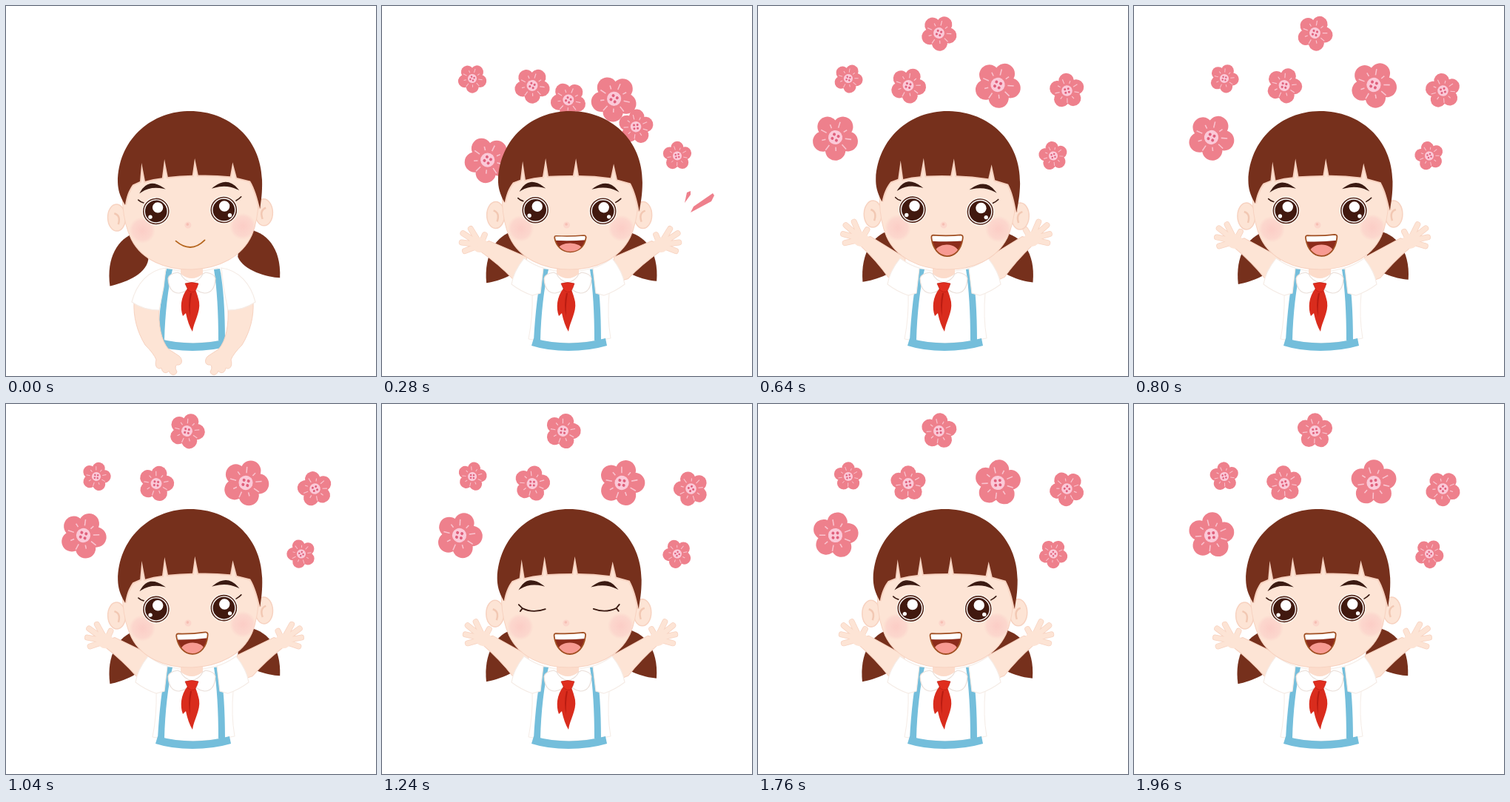
Animation of 500 by 500 pixels, one loop 2 s. Source, as an HTML page with a canvas:

```html
<!DOCTYPE html>
<html lang="en">
<head>
<meta charset="utf-8">
<title>Girl with blossoms</title>
<style>
html, body { margin: 0; width: 100%; height: 100%; overflow: hidden; background: #fff; }
canvas { display: block; width: 500px; height: 500px; }
</style>
</head>
<body>
<canvas id="stage" width="500" height="500"></canvas>
<script>
const ctx = document.getElementById('stage').getContext('2d');
const LOOP = 2000, STEP = 40, TAU = Math.PI * 2, RAD = Math.PI / 180;
const SKIN = '#fde4d5', EDGE = '#f7d2c0', HAIR = '#76301c', DARK = '#3a1a12', SHIRT_EDGE = '#f5ece6', BLUE = '#74bedb';

const ramp = (t, a, b) => Math.min(1, Math.max(0, (t - a) / (b - a)));
const easeOut = p => 1 - (1 - p) * (1 - p);

function shape(d, fill, line, width = 1) {
  const p = new Path2D(d);
  if (fill) { ctx.fillStyle = fill; ctx.fill(p); }
  if (line) { ctx.strokeStyle = line; ctx.lineWidth = width; ctx.stroke(p); }
}

function oval(x, y, rx, ry, fill, line, width = 1) {
  ctx.beginPath();
  ctx.ellipse(x, y, rx, ry, 0, 0, TAU);
  if (fill) { ctx.fillStyle = fill; ctx.fill(); }
  if (line) { ctx.strokeStyle = line; ctx.lineWidth = width; ctx.stroke(); }
}

function group(draw) {
  ctx.save();
  draw();
  ctx.restore();
}

function spin(x, y, deg) {
  ctx.translate(x, y);
  ctx.rotate(deg * RAD);
  ctx.translate(-x, -y);
}

// draws a left part, then its mirror image about x = axis
function pair(axis, draw) {
  draw();
  group(() => {
    ctx.translate(axis * 2, 0);
    ctx.scale(-1, 1);
    draw();
  });
}

// end x, y, radius, start x, y, start time, first angle
const blossoms = [
  [122, 98, 19.5, 250, 240, 40, 42],
  [203, 107.5, 24, 250, 240, 40, 42],
  [399, 202.5, 19.5, 250, 240, 40, 6],
  [244.5, 36.5, 24, 261, 240, 200, 47.5],
  [324, 106.5, 31, 250, 240, 130, 47.5],
  [417.5, 114.5, 23.5, 250, 224, 200, 11.5],
  [104.5, 177.5, 31, 250, 294, 163, 51]
];

function blossom([x, y, r, x0, y0, start, angle], t) {
  const k = easeOut(ramp(t, start, start + 240));
  if (!k) return;
  group(() => {
    ctx.translate(x0 + (x - x0) * k, y0 + (y - y0) * k);
    ctx.rotate((angle - 0.024 * t) * RAD);
    ctx.scale(r, r);
    for (let i = 0; i < 5; i++) {
      const a = (i * 72 - 90) * RAD;
      oval(Math.cos(a) * 0.57, Math.sin(a) * 0.57, 0.44, 0.44, '#ee808c');
    }
    oval(0, 0, 0.5, 0.5, '#ee808c');
    ctx.strokeStyle = '#f9c3cf';
    ctx.lineWidth = 0.05;
    ctx.beginPath();
    for (let i = 0; i < 9; i++) {
      const a = (i * 40 + 12) * RAD, end = i % 2 ? 0.6 : 0.7;
      ctx.moveTo(Math.cos(a) * 0.43, Math.sin(a) * 0.43);
      ctx.lineTo(Math.cos(a) * end, Math.sin(a) * end);
    }
    ctx.stroke();
    oval(0, 0, 0.31, 0.31, '#fbc9d8');
    for (let i = 0; i < 4; i++) {
      const a = (i * 90 + 35) * RAD;
      oval(Math.cos(a) * 0.14, Math.sin(a) * 0.14, 0.065, 0.065, '#e0607c');
    }
  });
}

function pigtails() {
  shape('M178 304 C154 311 137 336 141 375 C158 372 190 362 194 341 Q192 318 178 304Z', HAIR);
  shape('M328 304 C354 308 374 330 371 371 C354 370 322 360 315 341 Q316 318 328 304Z', HAIR);
}

function raisedArm(deg) {
  group(() => {
    spin(190, 365, deg);
    shape('M198 340 L150 313 Q138 315 136 325 Q160 346 176 367 L198 376Z', SKIN, EDGE);
    const tips = [[116, 323], [113, 311], [116, 299], [127, 294], [145, 304]];
    ctx.lineCap = 'round';
    for (const [w, color] of [[8, EDGE], [6.5, SKIN]]) {
      ctx.strokeStyle = color;
      ctx.lineWidth = w;
      ctx.beginPath();
      for (const [x, y] of tips) {
        ctx.moveTo(138, 317);
        ctx.lineTo(x, y);
      }
      ctx.stroke();
    }
    oval(137, 317, 10.5, 10, SKIN);
    shape('M140 318 L150 324', null, SKIN, 14);
  });
}

function sleeve() {
  shape('M218 354 C206 351 198 345 192 341 C184 351 177 363 175 376 Q188 386 203 391 L214 388Z', '#fff', SHIRT_EDGE, 1.2);
}

function loweredArm(deg) {
  group(() => {
    spin(190, 365, deg);
    shape('M173 400 C172 420 177 440 188 458 Q200 470 203 478 C200 488 206 492 210 489 C211 497 218 497 220 493 C222 500 230 500 231 494 C228 489 229 486 231 485 C239 486 239 477 234 473 L220 464 C209 452 206 430 207 408Z', SKIN, EDGE);
    shape('M216 354 C192 357 176 376 170 400 Q186 411 207 411 L213 380Z', '#fff', SHIRT_EDGE, 1.2);
  });
}

function torso() {
  shape('M216 354 Q250 364 286 354 L307 388 Q304 420 309 449 Q252 462 198 450 Q204 420 203 388Z', '#fff', SHIRT_EDGE);
  shape('M205 449 Q252 462 302 449 L304 459 Q280 466 252 466 Q224 466 202 459Z', BLUE);
  shape('M217 355 L225 356 C219 380 215 415 214 452 L205 452 C207 415 211 380 217 355Z', BLUE);
  shape('M281 356 L289 355 C294 380 296 415 296 452 L287 452 C287 415 285 380 281 356Z', BLUE);
}

function collar() {
  shape('M236 345 H266 V362 Q251 374 236 362Z', '#fcdccb');
  pair(251, () => shape('M232 360 Q220 362 219 368 Q220 388 234 388 Q247 386 251 374 Q240 371 236 362Z', '#fff', '#eadfd9', 1.2));
  shape('M245 382 C236 393 235 408 239 419 L243 415 Q246 430 252 440 C254 426 263 414 261 400 C259 391 257 386 255 381Z', '#d92c1d');
  shape('M249 388 Q245 404 249 420 Q248 404 251 388Z', '#b91c12');
  shape('M242 375 Q251 372 260 375 Q258 382 255 386 Q250 388 246 384Z', '#e02d1e', '#b91c12', 0.6);
}

function blush(x, y) {
  const g = ctx.createRadialGradient(x, y, 2, x, y, 18);
  g.addColorStop(0, 'rgba(250,185,185,.5)');
  g.addColorStop(0.7, 'rgba(250,190,190,.35)');
  g.addColorStop(1, 'rgba(250,195,192,0)');
  oval(x, y, 18, 18, g);
}

function eye(x, y, shine, side) {
  oval(x, y, 19, 19, '#fffaf5');
  oval(x, y, 17, 17, '#fff', '#57281b', 1.6);
  oval(x, y, 14.8, 14.8, '#41190f');
  oval(x + shine, y - 5, 7.2, 7.2, '#fff');
  oval(x + 8 * side, y + 7.5, 2.7, 2.7, '#fff');
}

function mouth(t) {
  ctx.lineCap = ctx.lineJoin = 'round';
  if (t < 80) {
    shape('M232 317 Q252 335 271 317', null, '#b5651d', 1.8);
    return;
  }
  const open = easeOut(ramp(t, 40, 500));
  group(() => {
    ctx.translate(254, 310 + 3 * (1 - open));
    ctx.scale(1, 0.45 + 0.55 * open * open);
    const d = 'M-19 0 Q0 1 18 -1 Q22 -1 21 4 C19 20 10 28 0 28 C-11 28 -19 18 -21 5 Q-22 0 -19 0Z';
    ctx.save();
    ctx.clip(new Path2D(d));
    shape(d, '#8c2b1b');
    oval(0, 23, 16, 10.5, '#f79a92');
    shape('M-22 -2 L22 -3 L21 7 Q0 9 -21 8Z', '#fff');
    ctx.restore();
    shape(d, null, '#a04f22', 1.8);
  });
}

function head(t) {
  oval(153, 283, 12, 18, SKIN, EDGE, 1.5);
  oval(352, 282, 12, 18, SKIN, EDGE, 1.5);
  shape('M150 277 Q159 280 155 292', null, '#f2c8b3', 2.5);
  shape('M355 276 Q346 279 350 291', null, '#f2c8b3', 2.5);
  shape('M165 215 H342 C347 250 348 282 335 312 C321 341 289 356 253 356 C217 356 185 341 172 313 C159 284 160 250 165 215Z', SKIN, EDGE, 1);
  const fringe = 'C344 262 341 250 335 239 L317 234 L312 213 L308 232 Q286 229 265 229 L261 206 L257 229 Q239 229 224 230 L220 206 L216 231 Q204 232 193 235 L189 210 L186 235 L176 239 C170 247 167 255 165 266';
  shape('M347 277 ' + fringe, null, EDGE, 4);
  shape('M347 277 ' + fringe + ' C158 254 156 245 156 235 C158 180 201 142 253 142 C307 142 351 180 351 238 C351 255 349 265 347 277Z', HAIR);

  shape('M187 249 Q198 231 217 245 Q200 241 187 249Z', DARK, DARK, 1.5);
  shape('M286 246 Q304 233 317 249 Q303 242 286 246Z', DARK, DARK, 1.5);
  blush(187, 301);
  blush(323, 300);
  oval(249, 296, 4.5, 4.5, '#fcd6cb');
  oval(248.5, 295, 1.8, 1.8, '#f6beb3');

  ctx.lineCap = 'round';
  if (t >= 1160 && t < 1320) {
    shape('M185 271 L190 276 Q204 283 221 277 M190 276 L187 280', null, DARK, 1.8);
    shape('M321 271 L317 276 Q302 283 286 277 M317 276 L320 280', null, DARK, 1.8);
  } else {
    eye(206.5, 276, 2.5, -1);
    eye(298, 277, 1, 1);
    shape('M190 264 Q186 263 183 260', null, DARK, 1.6);
    shape('M315 265 Q319 263 322 260', null, DARK, 1.6);
  }
  mouth(t);
}

function sparks(t) {
  if (t < 240 || t >= 360) return;
  shape('M417 279 L421 271 L447 253 L449 256 L445 264Z', '#ee808c');
  shape('M409 266 L412 252 L417 250 L417 255Z', '#ee808c');
}

function draw(t) {
  const sway = -Math.cos(TAU * t / 1000);
  const tilt = 1.8 * sway;
  const lift = 3.5 * sway - 38 * Math.pow(1 - ramp(t, 160, 400), 2.5);

  ctx.fillStyle = '#fff';
  ctx.fillRect(0, 0, 500, 500);
  sparks(t);
  blossoms.forEach(b => blossom(b, t));
  group(() => { spin(250, 395, tilt); pigtails(); });
  torso();
  if (t < 160) {
    pair(253.5, () => loweredArm(103 * t / 120));
  } else {
    pair(254.5, () => raisedArm(lift));
    pair(251.5, sleeve);
  }
  collar();
  group(() => { spin(250, 395, tilt); head(t); });
}

const begin = performance.now();
function tick() {
  const t = (performance.now() - begin) % LOOP;
  draw(Math.floor(t / STEP) * STEP);
  requestAnimationFrame(tick);
}
tick();
</script>
</body>
</html>
```
